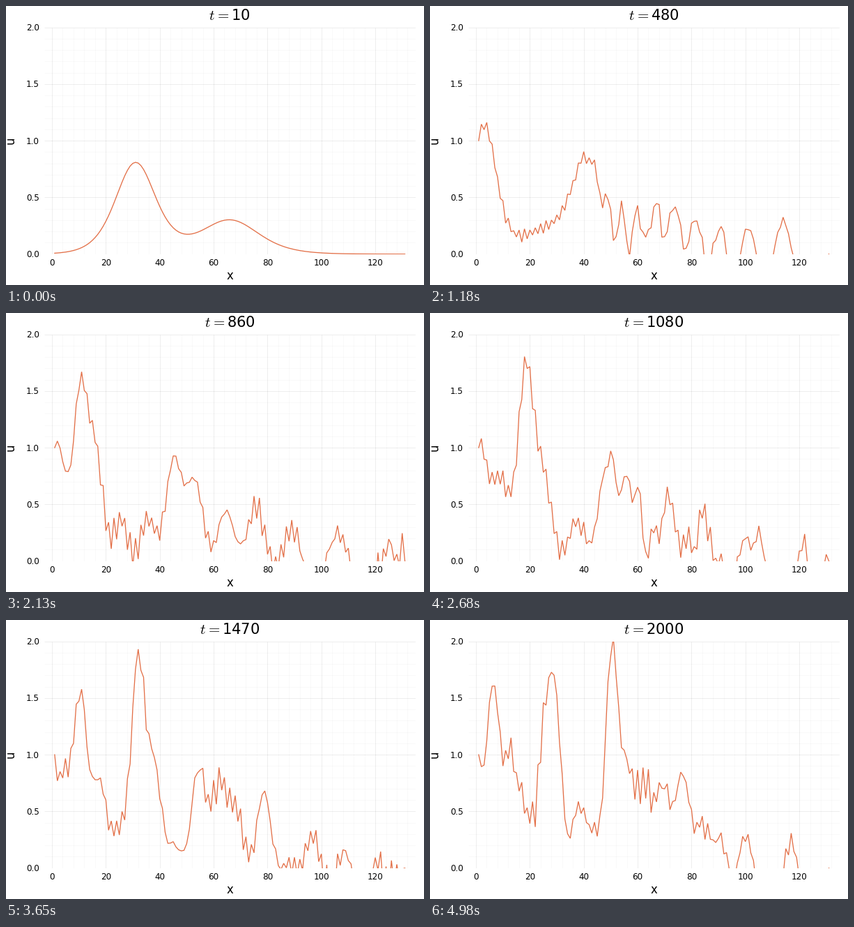
Write a matplotlib script that moves like this. It is 600 px wide and 400 px high and loops after 5.01 s.

```python
import numpy as np
import matplotlib.pyplot as plt
from matplotlib.animation import FuncAnimation
from matplotlib.collections import LineCollection

plt.rcParams["font.family"] = "DejaVu Sans"
plt.rcParams["mathtext.fontset"] = "cm"

W, H = 600, 400
PX = 0.72                      # points per pixel at 100 dpi
X0, XS = 66.0, 3.867           # pixel of x = 0, pixels per unit
Y0, YS = 355.7, 162.6          # pixel of u = 0, pixels per unit
XMIN, XMAX = -2.9, 134.9

# Korteweg-de Vries equation, leapfrog scheme
N, STEPS, STRIDE = 131, 2000, 10
DS, DT, EPS, MU = 0.4, 0.1, 0.2, 0.1


def change(u):
    """Change of the inner points over two time steps."""
    v = np.concatenate((u[:1], u, u[-1:]))
    ll, l, c, r, rr = v[:-4], v[1:-3], v[2:-2], v[3:-1], v[4:]
    steepen = EPS * DT / (3 * DS) * (l + c + r) * (r - l)
    disperse = MU * DT / DS**3 * (rr + 2 * l - 2 * r - ll)
    return -steepen - disperse


def solve():
    x = DS * np.arange(N)
    old = (0.8 * (1 - np.tanh(3 * x / 12 - 3)**2)
           + 0.3 * (1 - np.tanh(4.5 * x / 26 - 4.5)**2))
    now = old.copy()
    now[1:-1] += change(old) / 2
    now[0], now[-1] = 1, 0
    waves = []
    for n in range(STEPS):
        if n % STRIDE == 0:
            waves.append(old)
        new = now.copy()
        new[1:-1] = old[1:-1] + change(now)
        old, now = now, new
    return waves


waves = solve()

fig = plt.figure(figsize=(W / 100, H / 100), dpi=100, facecolor="white")
left, right = X0 + XMIN * XS, X0 + XMAX * XS
top = Y0 - 2 * YS
ax = fig.add_axes([left / W, 1 - Y0 / H, (right - left) / W, (Y0 - top) / H])
ax.set_xlim(XMIN, XMAX)
ax.set_ylim(0, 2)
ax.axis("off")


def grid(xs, ys, alpha):
    lines = [[(x, 0), (x, 2)] for x in xs]
    lines += [[(XMIN, y), (XMAX, y)] for y in ys]
    ax.add_collection(LineCollection(lines, colors=[(0, 0, 0, alpha)],
                                     linewidths=0.7 * PX, zorder=1),
                      autolim=False)


def label(x, y, text, size, **kw):
    kw = {"ha": "center", "va": "baseline", **kw}
    return fig.text(x / W, 1 - y / H, text, fontsize=size * PX, **kw)


xticks = range(0, 121, 20)
yticks = np.arange(0, 2.1, 0.5)
grid(range(0, 133, 4), np.arange(21) / 10, 0.03)
grid(xticks, yticks, 0.06)

for x in xticks:
    label(X0 + x * XS, 371.5, str(x), 12)
for y in yticks:
    label(48, Y0 - y * YS + 4.5, f"{y:.1f}", 12, ha="right")

mid = (left + right) / 2
label(mid, 391.5, "x", 16.5)
label(15.5, 193, "u", 16.5, rotation=90, ha="right", va="center")
title = label(mid, 20, "", 21)

curve, = ax.plot([], [], color="#e36f47", lw=1.3 * PX,
                 solid_joinstyle="miter", zorder=3)


def draw(tick):
    # a new wave every 25 ms, on a 10 ms clock
    k = min(tick * 10 // 25, len(waves) - 1)
    curve.set_data(np.arange(1, N + 1), waves[k])
    title.set_text(r"$t\hspace{0.05}=$" + str((k + 1) * STRIDE))
    return curve, title


anim = FuncAnimation(fig, draw, frames=501, interval=10, repeat=True,
                     repeat_delay=0, blit=False)
plt.show()
```
